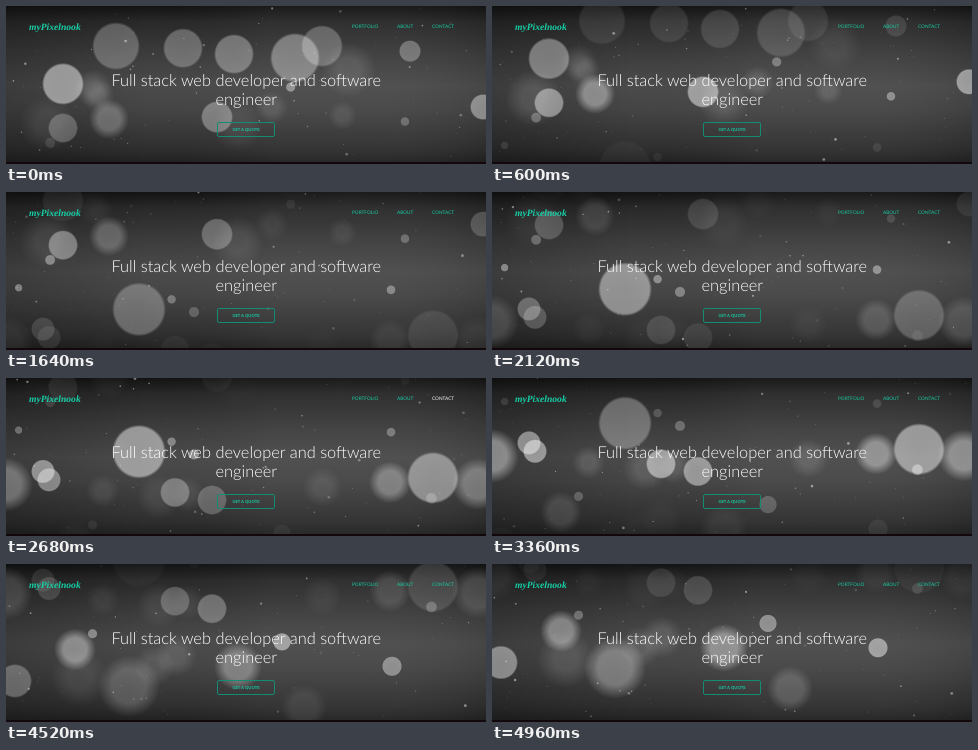
An HTML page with a canvas that plays this animation: 480 by 158 pixels, repeating every 5 s.

```html
<!DOCTYPE html>
<html lang="en">
<head>
<meta charset="utf-8">
<title>Portfolio header</title>
<style>
html, body { margin: 0; width: 100%; height: 100%; overflow: hidden; background: #111; }
canvas { display: block; width: 480px; height: 158px; }
</style>
</head>
<body>
<canvas id="stage" width="480" height="158"></canvas>
<script>
const ctx = document.getElementById('stage').getContext('2d');
const W = 480, H = 158, LOOP = 5, STEP = 0.04;
const TEAL = '#17cfa6';

// Every light rises at one speed and glows most where it crosses the band.
const RISE = 42, BAND = 80, SPREAD = 50;

// Main lights: time of crossing the band (s), x, radius.
const sharpLights = [
  [-.95, 110, 24], [-.9, 177, 20], [-.76, 228, 20], [-.67, 289, 25],
  [-.95, 316, 21], [-.83, 404, 11], [-.05, 57, 21], [.5, 477, 13],
  [.74, 211, 16], [1, 57, 15], [2.53, 133, 27], [3, 37, 12],
  [3.15, 427, 26], [3.2, 43, 12], [3.5, 169, 15], [3.68, 206, 15],
  [4.47, 276, 9], [5.05, 386, 10], [5.4, 9, 17]
];
const softLights = [
  [.79, 103, 20], [3.26, 384, 21], [3.3, 472, 26], [3.31, 0, 27],
  [4.65, 69, 21], [5.05, 232, 24], [5.53, 123, 31], [6.03, 298, 23]
];

function mulberry(seed) {
  return () => {
    seed = (seed + 0x6D2B79F5) | 0;
    let n = Math.imul(seed ^ seed >>> 15, 1 | seed);
    n = n + Math.imul(n ^ n >>> 7, 61 | n) ^ n;
    return ((n ^ n >>> 14) >>> 0) / 4294967296;
  };
}

const random = mulberry(27);
const between = (low, high) => low + random() * (high - low);
const scatter = (count, make) => Array.from({ length: count }, make);

const sparks = scatter(9, () => [between(0, LOOP), between(0, W), between(4, 7)]);
const haze = scatter(14, () => [between(-1, 6), between(0, W), between(14, 32)]);
const dust = scatter(95, () => ({
  x: between(0, W),
  y: between(0, H),
  vx: between(-5, 5),
  vy: between(-32, -8),
  r: .35 + random() ** 3 * 1.1,
  phase: between(0, 6.28)
}));

const white = a => `rgba(255,255,255,${a})`;
const black = a => `rgba(0,0,0,${a})`;

function fill(gradient, stops, x, y, w, h) {
  stops.forEach(([at, color]) => gradient.addColorStop(at, color));
  ctx.fillStyle = gradient;
  ctx.fillRect(x, y, w, h);
}

function drawBackdrop() {
  fill(ctx.createLinearGradient(0, 0, 0, H), [
    [0, '#131313'], [.1, '#292929'], [.3, '#3c3c3c'], [.5, '#4b4b4b'],
    [.65, '#454545'], [.9, '#2f2f2f'], [1, '#202020']
  ], 0, 0, W, H);
  fill(ctx.createLinearGradient(0, 0, W, 0), [
    [0, black(.2)], [.3, black(0)], [.55, white(.03)], [.8, white(.03)], [1, black(.06)]
  ], 0, 0, W, H);
}

function drawLights(lights, t, opacity, core) {
  for (const [crossing, x, r] of lights) {
    const y = BAND - RISE * (t - crossing);
    if (y < -r || y > H + r) continue;
    const a = opacity * Math.exp(-(((y - BAND) / SPREAD) ** 2));
    fill(ctx.createRadialGradient(x, y, 0, x, y, r), [
      [0, white(a * .95)], [core, white(a)], [(1 + core) / 2, white(a * .5)], [1, white(0)]
    ], x - r, y - r, 2 * r, 2 * r);
  }
}

function drawDust(t) {
  for (const d of dust) {
    const x = (d.x + d.vx * t + W) % W;
    const y = (d.y + d.vy * t + 2 * H) % H;
    ctx.fillStyle = white(.27 + .2 * Math.sin(d.phase + t * 2.4));
    ctx.beginPath();
    ctx.arc(x, y, d.r, 0, 2 * Math.PI);
    ctx.fill();
  }
}

// Large type scaled down keeps fractional letter spacing.
function write(text, x, y, size, style, color, align = 'left') {
  const zoom = 4;
  const [weight, family] = style;
  ctx.save();
  ctx.translate(x, y);
  ctx.scale(1 / zoom, 1 / zoom);
  ctx.font = `${weight} ${size * zoom}px ${family}`;
  ctx.textRendering = 'geometricPrecision';
  ctx.fillStyle = color;
  ctx.textAlign = align;
  ctx.fillText(text, 0, 0);
  ctx.restore();
}

const LATO = 'Lato, sans-serif';
const LOGO = ['italic bold', '"Liberation Serif", serif'];

function drawButton(hovered) {
  if (hovered) {
    ctx.save();
    ctx.shadowColor = black(.6);
    ctx.shadowBlur = 5;
    ctx.shadowOffsetY = 2;
    ctx.fillStyle = 'rgba(60,60,60,.55)';
    ctx.fillRect(211, 116, 58, 15);
    ctx.restore();
  }
  ctx.strokeStyle = hovered ? '#8e8e8e' : '#148c73';
  ctx.lineWidth = 1;
  ctx.beginPath();
  ctx.roundRect(211.5, 116.5, 57, 14, 1.5);
  ctx.stroke();
  write('GET A QUOTE', 240, 125, 4.2, ['bold', LATO], hovered ? '#fff' : TEAL, 'center');
}

function drawPage(t) {
  const contactHovered = t >= 2.48 && t < 2.96;
  const buttonHovered = t >= 3.76 && t < 4.44;
  const nav = ['400', LATO], heading = ['300', LATO];
  write('myPixelnook', 23, 23.5, 9.6, LOGO, TEAL);
  write('PORTFOLIO', 346, 21.8, 4.75, nav, TEAL);
  write('ABOUT', 391, 21.8, 4.75, nav, TEAL);
  write('CONTACT', 426, 21.8, 4.75, nav, contactHovered ? '#fff' : TEAL);
  write('Full stack web developer and software', 240.3, 79.5, 16.4, heading, '#fff', 'center');
  write('engineer', 240.3, 98.5, 16.4, heading, '#fff', 'center');
  drawButton(buttonHovered);
}

const origin = performance.now();

function render() {
  const elapsed = (performance.now() - origin) / 1000 % LOOP;
  const t = Math.floor(elapsed / STEP + 1e-6) * STEP;
  drawBackdrop();
  drawLights(haze, t, .13, .4);
  drawLights(softLights, t, .4, .55);
  drawLights(sharpLights, t, .48, .9);
  drawLights(sparks, t, .4, .8);
  drawDust(t);
  ctx.fillStyle = '#12080c';
  ctx.fillRect(0, 156, W, 2);
  drawPage(t);
  requestAnimationFrame(render);
}

render();
</script>
</body>
</html>
```
